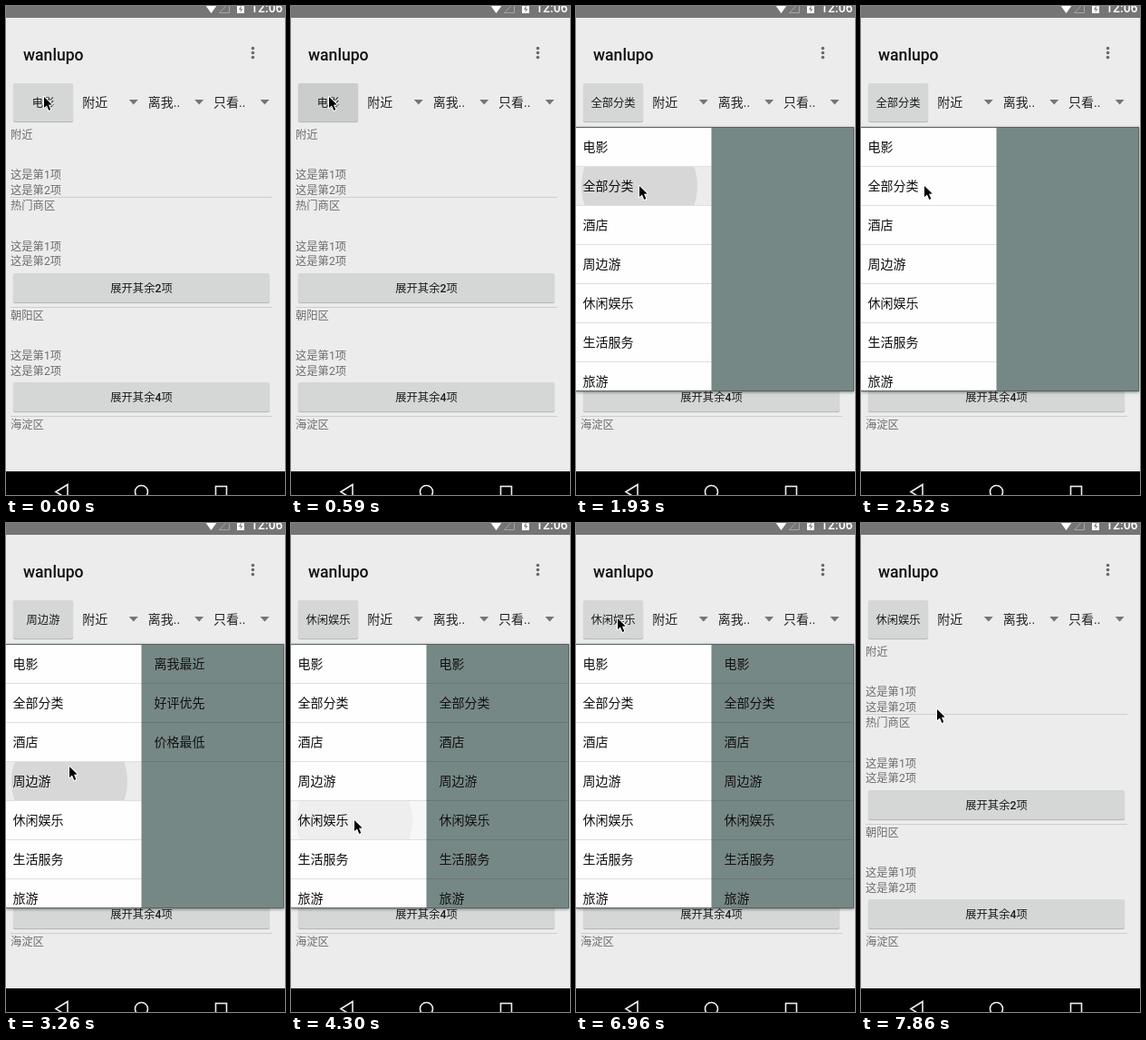
Animation, 308 px wide and 538 px high, one loop 8 s. Source, as an HTML page with a canvas:

```html
<!DOCTYPE html>
<html lang="zh">
<head>
<meta charset="utf-8">
<style>
html, body { margin: 0; width: 100%; height: 100%; overflow: hidden; background: #ececec; }
canvas { display: block; width: 308px; height: 538px; }
</style>
</head>
<body>
<canvas id="stage" width="308" height="538"></canvas>
<script>
const ctx = document.getElementById('stage').getContext('2d');
const FONT = 'Roboto, "Noto Sans CJK SC", "Noto Sans CJK", sans-serif';
const SMALL = 12.3, LARGE = 14;
const ROW = 43, POPUP = { top: 134, bottom: 423, split: 149.5, right: 306 };
const CATEGORIES = ['电影', '全部分类', '酒店', '周边游', '休闲娱乐', '生活服务', '旅游'];
const SORTS = ['离我最近', '好评优先', '价格最低'];

// The screen refreshes in even steps; all times below are step numbers.
const LOOP = 8000, STEPS = 54;
const PRESS = 4, OPEN = 5, RELEASE = 7, SCROLLBAR_END = 13, CLOSE = 50;
const TAPS = [
  { step: 13, row: 1 }, { step: 18, row: 2 },
  { step: 22, row: 3, details: SORTS },
  { step: 28, row: 4, details: CATEGORIES },
  { step: 38, row: 5, right: true }
];
// The pointer rests, then glides to each stop: [arrival, x, y]
const GLIDE = 2;
const STOPS = [
  [0, 41, 98], [10, 69, 196], [19, 69, 266], [25, 69, 325], [32, 167, 277],
  [36, 207, 378], [41, 190, 452], [44, 33, 82], [47, 45, 103], [53, 83, 203]
];

function pointerAt(step) {
  let [, x, y] = STOPS[0];
  for (const [arrival, toX, toY] of STOPS) {
    const k = Math.min(1, Math.max(0, 1 - (arrival - step) / GLIDE));
    x += (toX - x) * k;
    y += (toY - y) * k;
  }
  return [Math.round(x), Math.round(y)];
}

function rect(x, y, w, h, color) {
  ctx.fillStyle = color;
  ctx.fillRect(x, y, w, h);
}

function shape(points, fill, stroke, width = 1) {
  ctx.beginPath();
  points.forEach(([x, y]) => ctx.lineTo(x, y));
  ctx.closePath();
  if (stroke) {
    ctx.strokeStyle = stroke;
    ctx.lineWidth = width;
    ctx.stroke();
  }
  if (fill) {
    ctx.fillStyle = fill;
    ctx.fill();
  }
}

function circle(x, y, r, color) {
  ctx.beginPath();
  ctx.arc(x, y, r, 0, Math.PI * 2);
  ctx.fillStyle = color;
  ctx.fill();
}

function clipped(x, y, w, h, paint) {
  ctx.save();
  ctx.beginPath();
  ctx.rect(x, y, w, h);
  ctx.clip();
  paint();
  ctx.restore();
}

// Places text by the vertical centre of its ideographs
function text(str, x, middle, size, color, weight = 400, align = 'left') {
  ctx.font = `${weight} ${size}px ${FONT}`;
  ctx.textAlign = align;
  ctx.fillStyle = color;
  ctx.fillText(str, x, Math.round(middle + size * 0.38));
}

function button(label, x, y, w, h, color = '#d5d7d6') {
  ctx.save();
  ctx.shadowColor = 'rgba(0,0,0,.25)';
  ctx.shadowBlur = 1;
  ctx.shadowOffsetY = 1;
  ctx.beginPath();
  ctx.roundRect(x, y, w, h, 2);
  ctx.fillStyle = color;
  ctx.fill();
  ctx.restore();
  text(label, x + w / 2, y + h / 2, SMALL, '#1c1c1c', 500, 'center');
}

function drawStatusBar() {
  rect(0, 0, 308, 13, '#757575');
  text('12:06', 270, 2, 14, '#fff', 500);
  shape([[220, -1], [233, -1], [226.5, 8]], '#fff');
  shape([[235.5, 7.5], [246.5, 7.5], [246.5, -4]], null, '#a5a5a5');
  rect(255, -1, 8, 9, '#fff');
  shape([[260, -1], [257, 4], [261.5, 3], [258.5, 7]], '#757575');
}

function drawNavigation() {
  rect(0, 512, 308, 26, '#000');
  shape([[55, 534.5], [68, 526.5], [68, 542.5]], null, '#eee', 1.6);
  ctx.beginPath();
  ctx.arc(149.5, 534.5, 7, 0, Math.PI * 2);
  ctx.stroke();
  ctx.strokeRect(231.5, 528.5, 12, 12);
}

function drawSections() {
  const grey = '#6d6d6d';
  let y = 141;
  ['附近', '热门商区', '朝阳区', '海淀区'].forEach((title, i) => {
    text(title, 5, y, SMALL, grey);
    if (i) rect(5, Math.round(y - 9.5), 289, 1, '#cecece');
    if (i === 3) return;
    text('这是第1项', 5, y + 44.5, SMALL, grey);
    text('这是第2项', 5, y + 61, SMALL, grey);
    if (i) button(`展开其余${i * 2}项`, 8, Math.round(y + 74), 283, 32);
    y += i ? 120.5 : 78.5;
  });
}

function drawPage(choice, pressed) {
  rect(0, 0, 308, 538, '#ececec');
  drawStatusBar();
  text('wanlupo', 19, 53.5, 17.6, '#111', 500);
  for (let i = -1; i <= 1; i++) circle(272.5, 51.5 + i * 5, 1.8, '#6a6a6a');
  button(CATEGORIES[choice], 8, 85, 66, 42, pressed ? '#cbcdcc' : undefined);
  ['附近', '离我..', '只看..'].forEach((label, i) => {
    const x = 84.3 + i * 72.4;
    text(label, x, 105.5, LARGE, '#222');
    shape([[x + 51.5, 103], [x + 61.5, 103], [x + 56.5, 108.5]], '#757575');
  });
  drawSections();
  drawNavigation();
}

function drawList(items, left, width, indent) {
  items.forEach((label, i) => {
    text(label, left + indent, 154.5 + ROW * i, LARGE, '#111');
    rect(left, 176 + ROW * i, width, 1, 'rgba(0,0,0,.12)');
  });
}

function drawRipple({ step: start, row, right }, step) {
  const age = step - start;
  if (age < 0 || age > 1) return;
  const top = POPUP.top + ROW * row;
  const left = right ? POPUP.split : 0;
  clipped(left, top, right ? POPUP.right - left : POPUP.split, ROW - 1, () => {
    ctx.globalAlpha = 1 - age * 0.6;
    rect(left, top, 160, ROW, 'rgba(0,0,0,.07)');
    circle(left + 70, top + 21, right ? 39 : 64, 'rgba(0,0,0,.09)');
  });
}

function drawPopup(step, details) {
  const { top, bottom, split, right } = POPUP;
  ctx.save();
  ctx.shadowColor = 'rgba(0,0,0,.45)';
  ctx.shadowBlur = 3;
  ctx.shadowOffsetY = 1;
  rect(0, top - 1, right + 1, bottom - top + 2, '#566361');
  ctx.restore();
  clipped(0, top, right, bottom - top, () => {
    rect(0, top, right, 290, '#768886');
    rect(0, top, split, 290, '#fefefe');
    TAPS.forEach(tap => drawRipple(tap, step));
    drawList(CATEGORIES, 0, split, 7.5);
    drawList(details, split, right - split, 14);
    if (step < SCROLLBAR_END) rect(143, 137, 3, 189, '#d0d0d0');
  });
}

function drawPointer(x, y) {
  ctx.save();
  ctx.translate(x, y);
  ctx.lineJoin = 'round';
  shape([[1, 2], [1, 14], [4, 11.5], [6.3, 17], [8.3, 16], [6, 10.7], [9.7, 10.5]], '#000', '#fff', 2);
  ctx.restore();
}

function draw(now) {
  const step = Math.floor((now % LOOP) / LOOP * STEPS + 0.1) % STEPS;
  const chosen = TAPS.filter(tap => tap.step <= step && !tap.right).pop();
  drawPage(chosen?.row ?? 0, step >= PRESS && step < RELEASE);
  if (step >= OPEN && step < CLOSE) drawPopup(step, chosen?.details ?? []);
  drawPointer(...pointerAt(step));
}

const start = performance.now();
function tick() {
  draw(performance.now() - start);
  requestAnimationFrame(tick);
}
tick();
</script>
</body>
</html>
```
